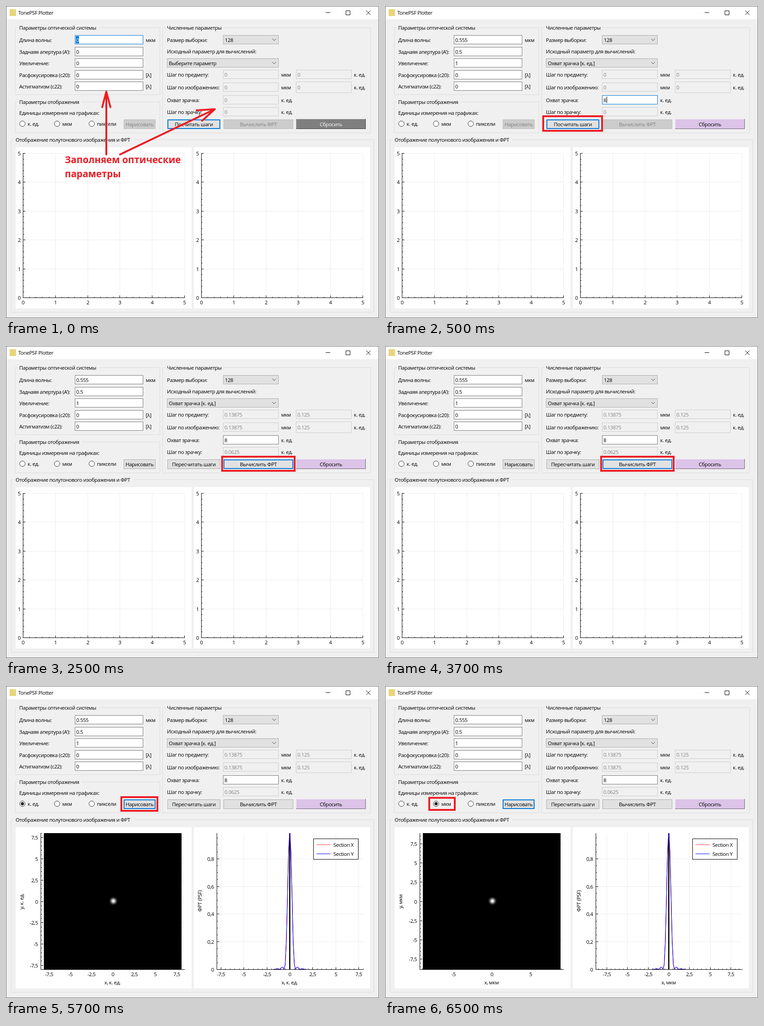
Recreate the animation shown at these times as an HTML page. Size 818x685 px, loop 8 s.

```html
<!DOCTYPE html>
<html lang="ru">
<head>
<meta charset="utf-8">
<title>TonePSF Plotter</title>
<style>
html, body { margin: 0; width: 100%; height: 100%; overflow: hidden; background: #f0f0f0; }
svg { display: block; }
text { font: 11.3px "Open Sans", "Noto Sans", sans-serif; letter-spacing: -0.4px; white-space: pre; }
text.note { font-size: 20.6px; font-weight: 700; letter-spacing: 0; }
</style>
</head>
<body>
<svg id="stage" width="818" height="685" viewBox="0 0 818 685"></svg>
<script>
const LOOP = 8000;
const BLUE = '#0078d7', RED = '#ed1c24', GREY = '#838383';
const stage = document.getElementById('stage');

const empty = {
  fields: ['0', '0', '0', '0', '0'], source: 'Выберите параметр',
  steps: ['0', '0', '0', '0', '0'], cover: '0', count: 'Посчитать шаги', focus: 'count', unit: -1
};
const filled = { ...empty, fields: ['0.555', '0.5', '1', '0', '0'], source: 'Охват зрачка [к. ед.]', cover: '8', ready: true };
const counted = {
  ...filled, steps: ['0.13875', '0.125', '0.13875', '0.125', '0.0625'],
  count: 'Пересчитать шаги', counted: true
};
const scenes = [
  { at: 0, ...empty, hint: true },
  { at: 500, ...filled, typing: true, mark: [347, 242, 129, 32] },
  { at: 2500, ...counted, focus: 'psf', mark: [474, 243, 159, 31] },
  { at: 4500, ...counted, focus: 'draw', unit: 0, mark: [253, 244, 79, 30] },
  { at: 6500, ...counted, focus: 'draw', unit: 1, mark: [97, 245.5, 56, 26.5] }
];

const rect = (x, y, w, h, fill, stroke = 'none', sw = 1) =>
  `<rect x="${x}" y="${y}" width="${w}" height="${h}" fill="${fill}" stroke="${stroke}" stroke-width="${sw}"/>`;
const path = (d, stroke = '#000', sw = 1, extra = '') =>
  `<path d="${d}" fill="none" stroke="${stroke}" stroke-width="${sw}" ${extra}/>`;
const text = (x, y, s, fill = '#000', anchor = 'start', extra = '') =>
  `<text x="${x}" y="${y}" fill="${fill}" text-anchor="${anchor}" ${extra}>${s}</text>`;
const upright = (x, y, s) => text(0, 0, s, '#000', 'middle', `transform="translate(${x} ${y}) rotate(-90)"`);
const half = v => Math.round(v) + 0.5;

function group(x, y, w, h, title, tx, tw) {
  return rect(x + .5, y + .5, w, h, 'none', '#dcdcdc') +
    rect(tx - 3, y - 1, tw + 6, 3, '#f0f0f0') + text(tx, y + 5, title);
}

function field(x, y, w, value, { off = false, focus = false, h = 19 } = {}) {
  return rect(x + .5, y + .5, w, h, off ? '#f0f0f0' : '#fff', focus ? BLUE : off ? '#ccc' : '#7a7a7a') +
    text(x + 3, y + h / 2 + 5, value, off ? GREY : '#000');
}

function combo(x, y, w, value) {
  return rect(x + .5, y + .5, w, 19, '#e1e1e1', '#adadad') + text(x + 4, y + 15, value) +
    path(`M${x + w - 13} ${y + 8}l4 4l4 -4`, '#444');
}

function button(x, w, label, { off = false, focus = false } = {}) {
  const box = focus
    ? rect(x + 1, 250, w - 2, 19, '#e1e1e1', BLUE, 2)
    : rect(x + .5, 249.5, w - 1, 20, off ? '#ccc' : '#e1e1e1', off ? '#bfbfbf' : '#adadad');
  return box + text(x + w / 2, 263.5, label, off ? GREY : '#000', 'middle');
}

function resetButton(ready) {
  return rect(636, 248, 153, 22, ready ? '#dcc3e8' : '#7f7f7f') +
    path('M636.5 270V248.5H789', ready ? '#f0e4f5' : '#a6a6a6') +
    path('M636 269.5H788.5V248', ready ? '#6e6274' : '#404040') +
    text(712.5, 263.5, 'Сбросить', ready ? '#000' : '#fff', 'middle');
}

function radio(x, label, on) {
  return `<circle cx="${x}" cy="258.5" r="6" fill="#fff" stroke="#333"/>` +
    (on ? `<circle cx="${x}" cy="258.5" r="3.5" fill="#222"/>` : '') + text(x + 11.5, 263, label);
}

const num = v => String(+v.toFixed(2)).replace('.', ',');

// zero: pixel of value 0; px: pixels per unit; from/to: pixel limits; cross: line of the axis
function axis(vertical, { zero, px, step, parts, from, to, cross, far, labels }) {
  let ticks = '', grid = '', out = '';
  const dir = vertical ? -1 : 1;
  const ends = [from, to].map(p => (p - zero) / px * dir).sort((a, b) => a - b);
  const small = step / parts;
  for (let i = Math.ceil(ends[0] / small - .05); i <= ends[1] / small + .05; i++) {
    const p = half(zero + dir * i * small * px);
    const big = i % parts === 0, len = big ? 5 : 2;
    ticks += vertical ? `M${cross} ${p}h${len}` : `M${p} ${cross}v${-len}`;
    if (!big) continue;
    grid += vertical ? `M${cross} ${p}H${far}` : `M${p} ${cross}V${far}`;
    out += vertical ? text(labels, p + 4, num(i * small), '#000', 'end')
                    : text(p, labels, num(i * small), '#000', 'middle');
  }
  const line = vertical ? `M${cross} ${from}V${to + 1}` : `M${from} ${cross}H${to + 1}`;
  return { grid: path(grid, '#c8c8c8', 1, 'stroke-dasharray="1 2"'), top: path(line + ticks) + out };
}

function blankPlot(left) {
  const x = axis(false, { zero: left, px: 70.8, step: 1, parts: 5, from: left, to: left + 354, cross: 640.5, far: 323, labels: 655 });
  const y = axis(true, { zero: 640, px: 63.4, step: 1, parts: 5, from: 323, to: 640, cross: left + .5, far: left + 354, labels: left - 5 });
  return x.grid + y.grid + x.top + y.top;
}

// Diffraction spot of a round pupil
function airy(r) {
  const u = (Math.PI * r) ** 2;
  let term = 1, sum = 1;
  for (let k = 1; k < 50; k++) sum += term *= -u / (k * (k + 1));
  return sum * sum;
}

function spotStops() {
  let s = '';
  for (let i = 0; i <= 12; i++) {
    const v = Math.round(255 * airy(i / 12 * .61));
    s += `<stop offset="${i / 12}" stop-color="rgb(${v},${v},${v})"/>`;
  }
  return s;
}

function curve() {
  const pts = [];
  for (let i = -14; i <= 14; i++) {
    const r = i / 8;
    pts.push(`${(622.3 + r * 20.12).toFixed(2)} ${(622 - airy(r) * 303.9).toFixed(2)}`);
  }
  return 'M' + pts.join('L');
}

const defs = `<defs><radialGradient id="spot">${spotStops()}</radialGradient>
  <clipPath id="area"><rect x="462" y="323" width="322" height="300"/></clipPath></defs>`;
const psf = curve();

function imagePlot(unit) {
  const px = unit ? 16.9 : 18.68, name = unit ? 'мкм' : 'к. ед.';
  const x = axis(false, { zero: 234, px, step: unit ? 5 : 2.5, parts: 5, from: 76, to: 391, cross: 622.5, far: 323, labels: 637 });
  const y = axis(true, { zero: 472.5, px, step: 2.5, parts: 5, from: 323, to: 622, cross: 76.5, far: 391, labels: 70 });
  return x.grid + y.grid + rect(83, 323, 302, 300, '#000') +
    '<circle cx="235.5" cy="472" r="11.4" fill="url(#spot)"/>' + x.top + y.top +
    text(233.5, 655, 'x, ' + name, '#000', 'middle') + upright(38, 473, 'y, ' + name);
}

function sectionPlot(unit) {
  const x = axis(false, { zero: 622, px: unit ? 18.12 : 20.12, step: 2.5, parts: 5, from: 462, to: 783, cross: 622.5, far: 323, labels: 637 });
  const y = axis(true, { zero: 622, px: 303.9, step: .2, parts: 4, from: 323, to: 622, cross: 462.5, far: 783, labels: 456 });
  return x.grid + y.grid +
    `<g clip-path="url(#area)">${path('M622.3 323V622', '#000', 2.6)}${path(psf, '#f00')}${path(psf, '#00f', 1.1)}</g>` +
    x.top + y.top +
    text(622, 655, 'x, ' + (unit ? 'мкм' : 'к. ед.'), '#000', 'middle') + upright(428.5, 472, 'ФРТ (PSF)') +
    rect(674.5, 335.5, 98, 45, '#fff', '#000') +
    path('M681 348.5h31', '#ff4040') + path('M681 368.5h31', '#00f') +
    text(718, 353, 'Section X') + text(718, 372.5, 'Section Y');
}

function hint() {
  const round = 'stroke-linejoin="round" stroke-linecap="round"';
  return path('M220 326V190M211 222L220 188L229 222', RED, 4, round) +
    path('M250 326L457 227M418 229L458 226.5L430 252', RED, 4, round) +
    text(129, 345, 'Заполняем оптические', RED, 'start', 'class="note"') +
    text(129, 375.5, 'параметры', RED, 'start', 'class="note"');
}

function titleBar() {
  return rect(0, 0, 818, 29, '#fff') + rect(8, 7, 14, 15, '#e8d47a') + text(27, 19, 'TonePSF Plotter') +
    path('M701 14.5h10M745.5 10.5h9v9h-9zM790 10l9.5 9.5M799.5 10l-9.5 9.5');
}

function optics(s) {
  const names = ['Длина волны:', "Заднаяя апертура (A'):", 'Увеличение:', 'Расфокусировка (c20):', 'Астигматизм (c22):'];
  const tops = [64, 90, 115, 141, 166], units = ['мкм', '', '', '[λ]', '[λ]'];
  let out = group(20, 47, 317, 147, 'Параметры оптической системы', 29, 171);
  names.forEach((n, i) => {
    out += text(29, tops[i] + 15, n) + text(306.5, tops[i] + 15, units[i]) +
      field(151, tops[i], 149, s.fields[i], { focus: s.hint && i === 0 });
  });
  if (s.hint) out += rect(153, 66, 7, 16, BLUE) + text(154, 78.5, '0', '#fff');
  return out;
}

function numbers(s) {
  const off = { off: true };
  return group(343, 47, 456, 231, 'Численные параметры', 353, 120) +
    text(353, 79, 'Размер выборки:') + combo(476, 64, 121, '128') +
    text(353, 104, 'Исходный параметр для вычислений:') + combo(353, 115, 244, s.source) +
    text(353, 155, 'Шаг по предмету:') + text(353, 182.5, 'Шаг по изображению:') +
    text(353, 210.5, 'Охват зрачка:') + text(353, 236.5, 'Шаг по зрачку:') +
    [140, 168].map((y, i) => field(476, y, 121, s.steps[i * 2], off) +
      field(636, i ? 166 : y, 121, s.steps[i * 2 + 1], i ? { off: true, h: 24 } : off) +
      text(603.5, y + 15, 'мкм') + text(763, y + 15, 'к. ед.')).join('') +
    field(476, 196, 121, s.cover, { off: !s.ready, focus: s.typing }) + text(603.5, 211, 'к. ед.') +
    (s.typing ? path('M486.5 199v14') : '') +
    field(476, 222, 121, s.steps[4], off) + text(603.5, 237, 'к. ед.') +
    button(354, 116, s.count, { focus: s.focus === 'count' }) +
    button(477, 153, 'Вычислить ФРТ', { off: !s.counted, focus: s.focus === 'psf' }) +
    resetButton(s.ready);
}

function display(s) {
  return group(20, 210, 317, 68, 'Параметры отображения', 29, 133) +
    text(29, 239, 'Единицы измерения на графиках:') +
    ['к. ед.', 'мкм', 'пиксели'].map((n, i) => radio(36 + i * 76, n, s.unit === i)).join('') +
    button(258, 70, 'Нарисовать', { off: !s.counted, focus: s.focus === 'draw' });
}

function render(s) {
  const plots = s.unit < 0 ? blankPlot(37) + blankPlot(428) : imagePlot(s.unit) + sectionPlot(s.unit);
  return defs + rect(0, 0, 818, 685, '#f0f0f0') + titleBar() + optics(s) + display(s) + numbers(s) +
    group(11, 293, 795, 379, 'Отображение полутонового изображения и ФРТ', 21, 256) +
    rect(21, 310, 386, 354, '#fff') + rect(412, 310, 386, 354, '#fff') + plots +
    (s.hint ? hint() : '') + (s.mark ? rect(...s.mark, 'none', RED, 4) : '') +
    rect(.5, .5, 817, 684, 'none', '#707070');
}

const pages = scenes.map(render);
let shown = -1;
function tick() {
  const t = performance.now() % LOOP;
  const now = scenes.filter(s => s.at <= t).length - 1;
  if (now !== shown) stage.innerHTML = pages[shown = now];
  requestAnimationFrame(tick);
}
tick();
</script>
</body>
</html>
```
